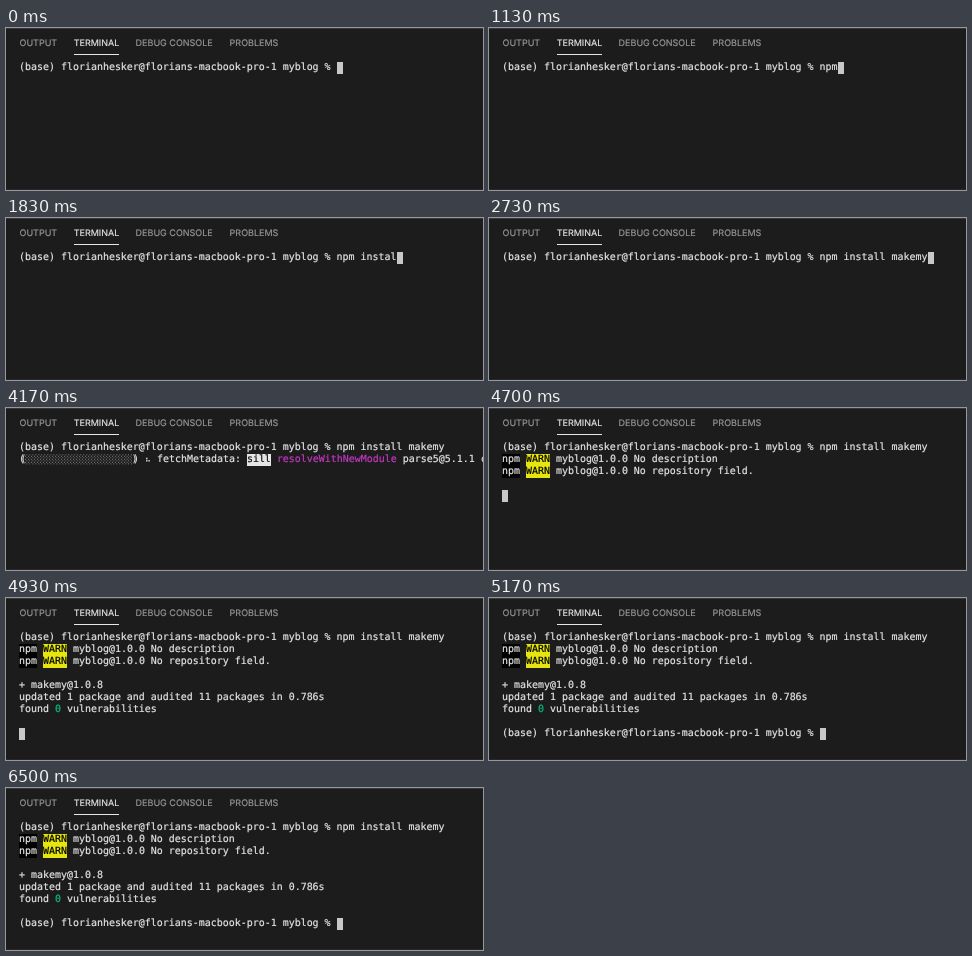
An HTML page that plays this animation: 477 by 162 pixels, repeating every 6530 ms.

```html
<!DOCTYPE html>
<html lang="en">
<head>
<meta charset="utf-8">
<title>Terminal</title>
<style>
  html, body { margin: 0; width: 100%; height: 100%; overflow: hidden; background: #1c1c1c; }
  #panel {
    position: relative; width: 477px; height: 162px; overflow: hidden;
    box-sizing: border-box; background: #1c1c1c; text-rendering: geometricPrecision;
  }
  #panel::before, #panel::after { content: ""; position: absolute; left: 0; right: 0; height: 1px; }
  #panel::before { top: 0; background: #383838; }
  #panel::after { bottom: 0; background: #2b2428; }

  .tab {
    position: absolute; top: 10px; white-space: nowrap;
    font: 9px/12px Inter, "Liberation Sans", sans-serif;
    -webkit-text-stroke: .15px currentColor; color: #989898;
  }
  .tab.active { color: #e7e7e7; }
  .tab.active::after {
    content: ""; position: absolute; left: 0; right: 0; top: 16px; height: 1px; background: #e7e7e7;
  }

  /* 9.967px gives a 6px cell */
  .row {
    position: absolute; left: 13px; top: calc(34px + 12px * var(--r)); height: 12px;
    font: 9.967px/12px "DejaVu Sans Mono", "Liberation Mono", monospace;
    -webkit-text-stroke: .2px currentColor;
    white-space: pre; color: #e5e5e5;
  }
  .row span { display: inline-block; height: 12px; line-height: 12px; vertical-align: top; }
  .row[hidden] { display: none; }
  .npm { background: #000; }
  .warn { background: #e5e510; color: #000; }
  .sill { background: #e5e5e5; color: #111; }
  .module { color: #c238c2; }
  .zero { color: #0dbc79; }
  .open { text-shadow: 1.6px 0 currentColor; }
  .close { text-shadow: -1.6px 0 currentColor; }
  .shade { opacity: .6; width: 108px; overflow: hidden; -webkit-text-stroke: 0; }
  #spin { width: 6px; font: 8px/12px "DejaVu Sans", sans-serif; }
  #cursor { position: absolute; width: 6px; height: 12px; background: #c8c8c8; }
</style>
</head>
<body>
<div id="panel">
  <div class="tab" style="left:13.5px">OUTPUT</div>
  <div class="tab active" style="left:67.7px">TERMINAL</div>
  <div class="tab" style="left:129.6px">DEBUG CONSOLE</div>
  <div class="tab" style="left:223.6px">PROBLEMS</div>

  <div class="row" style="--r:0">(base) florianhesker@florians-macbook-pro-1 myblog % <span id="typed"></span></div>

  <div class="row" style="--r:1" data-from="4170" data-to="4670"><span class="open">(</span><span class="shade">░░░░░░░░░░░░░░░░░░</span><span class="close">)</span> <span id="spin"></span> fetchMetadata: <span class="sill">sill</span> <span class="module">resolveWithNewModule</span> parse5@5.1.1 checking</div>

  <div class="row" style="--r:1" data-from="4670"><span class="npm">npm</span> <span class="warn">WARN</span> myblog@1.0.0 No description</div>
  <div class="row" style="--r:2" data-from="4670"><span class="npm">npm</span> <span class="warn">WARN</span> myblog@1.0.0 No repository field.</div>

  <div class="row" style="--r:4" data-from="4900">+ makemy@1.0.8</div>
  <div class="row" style="--r:5" data-from="4900">updated 1 package and audited 11 packages in 0.786s</div>
  <div class="row" style="--r:6" data-from="4900">found <span class="zero">0</span> vulnerabilities</div>
  <div class="row" style="--r:8" data-from="5030">(base) florianhesker@florians-macbook-pro-1 myblog % </div>

  <div id="cursor"></div>
</div>
<script>
  const LOOP = 6530;
  const PROMPT = 53; // columns before the command
  const COMMAND = 'npm install makemy';
  const KEYS = [
    830, 1000, 1100, 1200,
    1400, 1470, 1570, 1670, 1730, 1830, 2000, 2050,
    2200, 2300, 2400, 2530, 2630, 2730
  ];
  // time, row, column; row -1 hides the cursor
  const MOVES = [[3330, 1, 0], [4170, -1, 0], [4670, 4, 0], [4900, 8, 0], [5030, 8, PROMPT]];
  const SPIN = '⠋⠙⠹⠸⠼⠴⠦⠧⠇⠏';

  const byId = id => document.getElementById(id);
  const typed = byId('typed'), spin = byId('spin'), cursor = byId('cursor');
  const timed = [...document.querySelectorAll('[data-from]')];

  function draw(t) {
    const count = KEYS.filter(k => k <= t).length;
    typed.textContent = COMMAND.slice(0, count);

    for (const el of timed) {
      el.hidden = t < +el.dataset.from || t >= +(el.dataset.to || LOOP);
    }
    spin.textContent = SPIN[(Math.floor((t - 4430) / 70) + 100) % SPIN.length];

    const move = MOVES.filter(m => m[0] <= t).pop();
    const [, row, col] = move || [0, 0, PROMPT + count];
    cursor.hidden = row < 0;
    cursor.style.left = 13 + col * 6 + 'px';
    cursor.style.top = 34 + row * 12 + 'px';
  }

  const start = performance.now();
  function tick() {
    draw((performance.now() - start) % LOOP);
    requestAnimationFrame(tick);
  }
  tick();
</script>
</body>
</html>
```
